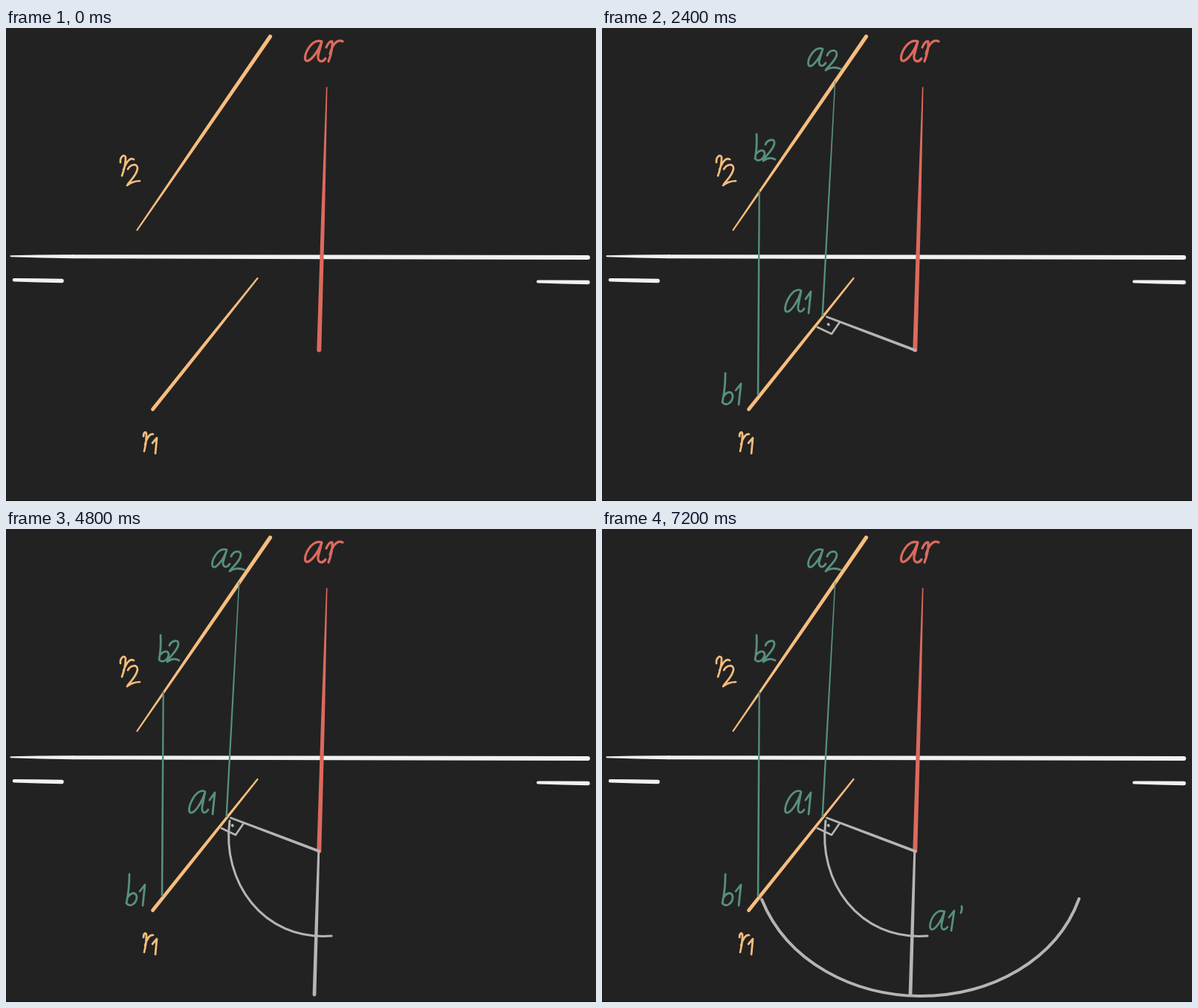
An HTML page with a canvas that plays this animation: 794x637 px, repeating every 8 s.

```html
<!DOCTYPE html>
<html lang="en">
<head>
<meta charset="utf-8">
<title>Rotating a line about an axis</title>
<style>
  html, body { margin: 0; width: 100%; height: 100%; overflow: hidden; background: #222; }
  canvas { display: block; }
</style>
</head>
<body>
<canvas id="board" width="794" height="637"></canvas>
<script>
const ctx = document.getElementById('board').getContext('2d');
const ORANGE = '#f8bd7d', RED = '#dc6a5c', GREEN = '#57907d', GREY = '#b5b5b5', WHITE = '#f0f1f4';
const STEP = 1200, LOOP = 8000;
ctx.lineCap = ctx.lineJoin = 'round';

// Straight pen stroke that swells quickly from width w1, then settles at w2
function taper(color, x1, y1, w1, x2, y2, w2) {
  const a = Math.atan2(y2 - y1, x2 - x1), q = Math.PI / 2;
  const nx = -Math.sin(a) / 2, ny = Math.cos(a) / 2;
  const mx = (x1 + x2) / 2, my = (y1 + y2) / 2;
  ctx.fillStyle = color;
  ctx.beginPath();
  ctx.arc(x1, y1, w1 / 2, a + q, a + 3 * q);
  ctx.quadraticCurveTo(mx - nx * w2, my - ny * w2, x2 - nx * w2, y2 - ny * w2);
  ctx.arc(x2, y2, w2 / 2, a - q, a + q);
  ctx.quadraticCurveTo(mx + nx * w2, my + ny * w2, x1 + nx * w1, y1 + ny * w1);
  ctx.fill();
}

function pen(color, width, path) {
  ctx.strokeStyle = color;
  ctx.lineWidth = width;
  ctx.stroke(new Path2D(path));
}

function givenLines() {
  taper(WHITE, 6.5, 307.3, 2, 90, 307.7, 5);
  taper(WHITE, 90, 307.7, 5, 783, 309, 6);
  taper(WHITE, 11, 339.3, 4.5, 75, 340.5, 5.5);
  taper(WHITE, 716, 341.5, 4, 783, 342.5, 5.5);
  taper(ORANGE, 176.5, 272, 2.2, 355.5, 11.5, 5.2);
  taper(ORANGE, 338.5, 337, 2.2, 197.5, 513.5, 4.8);
  taper(RED, 431.7, 80, 1.5, 421.3, 433.5, 6);
  pen(RED, 3.2, `M425 18C411 14 400 36 403 43C407 49 420 33 425 18L420 37C419 46 426 47 430 41
    M431 26Q435 17 439 18Q440 29 434 45M436 35C438 26 444 14 453 18`);
  pen(ORANGE, 2.7, `M154 181C153 174 159 169 161 174Q161 186 156 199M158 191C161 183 166 173 172 177
    M164 190C168 183 177 182 177 189C176 199 166 206 163 212C168 208 174 206 180 206`);
  pen(ORANGE, 2.7, `M185 550C185 544 189 542 189 548Q189 559 186 570M187 561C189 553 193 546 198 547
    M197 559L203 552L201 573`);
}

function pointsAB() {
  taper(GREEN, 211.7, 220, 2.2, 210, 494, 2.6);
  taper(GREEN, 313.7, 72, 1.4, 296.7, 387, 2.4);
  pen(GREEN, 2.8, `M297 28C285 24 275 44 278 50C282 56 294 39 297 28L292 45C292 53 298 52 301 47
    M303 37C306 29 316 28 316 35C315 45 303 52 301 57C306 53 314 52 321 55`);
  pen(GREEN, 2.8, `M208 143Q209 160 206 176C210 181 218 177 219 169C218 163 212 164 208 169
    M220 157C222 150 233 148 232 155C231 165 219 172 217 179C222 175 228 174 233 177`);
  pen(GREEN, 2.8, `M267 353C255 350 244 374 247 381C252 387 264 368 268 354L264 374C263 383 268 384 272 378
    M274 365L281 355L278 384`);
  pen(GREEN, 2.8, `M166 465Q166 485 162 504C167 510 175 505 176 496C175 488 168 489 163 497
    M180 488L187 479L184 507`);
}

function perpendicular() {
  taper(GREY, 302.5, 389, 2.8, 421.5, 434, 4);
  pen(GREY, 2.6, 'M290 403L309 412L320 396');
  pen(GREY, 3.6, 'M304.5 399l.5 .5');
}

function smallArc() {
  pen(GREY, 3, 'M301 393C290 474 345 555 438 548');
}

function axisExtension() {
  taper(GREY, 420.7, 436, 3, 415, 627, 4.8);
}

function rotatedA() {
  pen(GREEN, 2.7, `M460 515C448 511 439 531 442 538C446 544 457 528 461 515L457 532C456 541 461 541 465 536
    M467 523L474 514L470 541M484 508Q485 512 483 517`);
}

function largeArc() {
  pen(GREY, 4, 'M215 499C250 585 340 628 428 629C525 629 612 580 642 498');
}

const steps = [givenLines, pointsAB, perpendicular, smallArc, axisExtension, rotatedA, largeArc];

function draw() {
  const current = Math.floor(performance.now() % LOOP / STEP);
  ctx.fillStyle = '#222';
  ctx.fillRect(0, 0, 794, 637);
  ctx.fillStyle = '#111';
  ctx.fillRect(0, 636, 794, 1);
  for (const step of steps.slice(0, current + 1)) step();
  requestAnimationFrame(draw);
}
draw();
</script>
</body>
</html>
```
